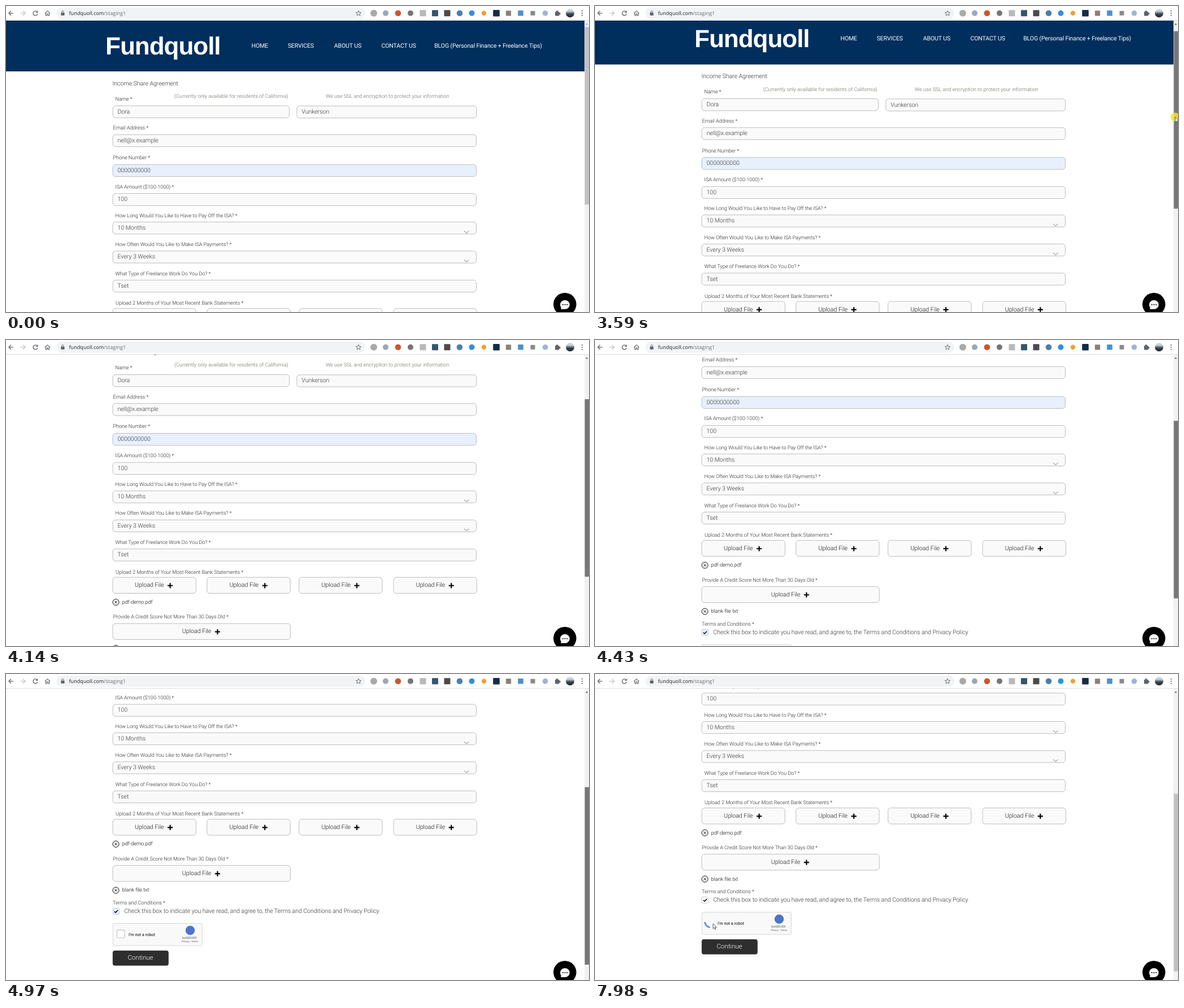
These frames come from a looping animation (1032x543 px, 8 s). An HTML page:

```html
<!DOCTYPE html>
<html lang="en">
<head>
<meta charset="utf-8">
<title>Income Share Agreement</title>
<style>
html, body { margin: 0; width: 100%; height: 100%; overflow: hidden; background: #fff; }
svg { display: block; width: 1032px; height: 543px; }
text { font-family: Roboto, sans-serif; font-weight: 300; white-space: pre; text-rendering: geometricPrecision; }
.body { font-size: 10.6px; letter-spacing: -.07px; fill: #2f2e2e; }
.value { font-size: 10.6px; letter-spacing: -.04px; fill: #333; }
.upload { font-size: 10.6px; fill: #111; }
.label { font-size: 9.1px; letter-spacing: -.04px; fill: #222; }
.note { font-size: 9.1px; letter-spacing: .03px; fill: #66665c; }
.file { font-size: 9.1px; fill: #000; }
.nav { font-size: 10.6px; letter-spacing: -.17px; fill: #fff; font-weight: 400; }
.logo { font: bold 44px "Liberation Sans", Arial, sans-serif; letter-spacing: -1px; fill: #fff; }
.url { font: 9.1px "Open Sans", sans-serif; fill: #202124; }
.submit { font-size: 11.5px; fill: #fff; }
.robot { font-size: 7.3px; font-weight: 400; fill: #000; }
.brand { font-size: 5.4px; font-weight: 400; fill: #555; }
.legal { font-size: 4.3px; font-weight: 400; fill: #555; }
.box { fill: #fafafa; stroke: #bcbcbc; stroke-width: 1; }
.line { fill: none; stroke: #5f6368; stroke-width: 1.3; }
</style>
</head>
<body>
<svg id="stage" viewBox="0 0 1032 543"></svg>
<script>
const LOOP = 8000;
const stage = document.getElementById('stage');

const text = (cls, x, y, s) => `<text class="${cls}" x="${x}" y="${y}">${s}</text>`;
const rect = (x, y, w, h, r, attrs) => `<rect x="${x}" y="${y}" width="${w}" height="${h}" rx="${r}" ${attrs}/>`;
const circle = (x, y, r, attrs) => `<circle cx="${x}" cy="${y}" r="${r}" ${attrs}/>`;
const path = (d, attrs) => `<path d="${d}" ${attrs}/>`;

// x, y, width, value, is a dropdown
const fields = [
  [189, 177, 312.5, 'Dora'],
  [514.8, 177.4, 318, 'Vunkerson'],
  [189, 228.3, 643.5, 'nell@x.example'],
  [189, 281.3, 643.5, '0000000000'],
  [189, 332.8, 643.5, '100'],
  [189, 383.3, 643.5, '10 Months', true],
  [189, 434.8, 643.5, 'Every 3 Weeks', true],
  [189, 486.4, 643.5, 'Tset'],
];
const PHONE = 3;
const labels = [
  [193.5, 167.5, 'Name *'],
  [189.5, 219.3, 'Email Address *'],
  [189.5, 272, 'Phone Number *'],
  [193.5, 323.6, 'ISA Amount ($100-1000) *'],
  [193.5, 374.7, 'How Long Would You Like to Have to Pay Off the ISA? *'],
  [193.5, 426, 'How Often Would You Like to Make ISA Payments? *'],
  [193.5, 477.8, 'What Type of Freelance Work Do You Do? *'],
  [194, 530.3, 'Upload 2 Months of Your Most Recent Bank Statements *'],
  [189.5, 609.8, 'Provide A Credit Score Not More Than 30 Days Old *'],
  [189, 687.8, 'Terms and Conditions *'],
];
const navigation = [[434.5, 'HOME'], [498.7, 'SERVICES'], [580.8, 'ABOUT US'], [664.5, 'CONTACT US'],
  [758.2, 'BLOG (Personal Finance + Freelance Tips)']];

const drawField = ([x, y, w, value, dropdown], i) =>
  rect(x, y, w, 21.3, 5, `class="box" id="field${i}"`) +
  text('value', x + 8.5, y + 13.6, value) +
  (dropdown ? path(`M811 ${y + 15.8}l4.3 3.8l4.3-3.8`, 'class="line" style="stroke:#777;stroke-width:1"') : '');

const drawUpload = (x, y, w, textX) =>
  rect(x, y, w, 28.4, 5, 'class="box"') + text('upload', textX, y + 17.3, 'Upload File') +
  path(`M${textX + 58} ${y + 14.7}h9.2m-4.6-4.6v9.2`, 'stroke="#000" stroke-width="2.1"');

const drawFile = (y, name) =>
  circle(194.5, y, 5.5, 'fill="none" stroke="#000"') +
  path(`M192.2 ${y - 2.3}l4.6 4.6m0-4.6l-4.6 4.6`, 'stroke="#000"') + text('file', 205.5, y + 2.7, name);

const page = `<g id="page">
  ${rect(0, 26, 1024, 90, 0, 'fill="#002e5d"')}${rect(0, 115, 1024, 1, 0, 'fill="#00254d"')}
  ${text('logo', 176, 85.5, 'Fundquoll')}
  ${navigation.map(([x, s]) => text('nav', x, 73.6, s)).join('')}
  ${text('body', 188.5, 140.8, 'Income Share Agreement')}
  ${text('note', 298, 163, '(Currently only available for residents of California)')}
  ${text('note', 566, 163, 'We use SSL and encryption to protect your information')}
  ${labels.map(([x, y, s]) => text('label', x, y, s)).join('')}
  ${fields.map(drawField).join('')}
  ${[[189, 228], [355.8, 395.6], [518.7, 558.5], [686, 725.7]].map(([x, tx]) => drawUpload(x, 536.7, 147.3, tx)).join('')}
  ${drawFile(580.8, 'pdf-demo.pdf')}
  ${drawUpload(189, 618.7, 314.3, 311.8)}
  ${drawFile(662.8, 'blank file.txt')}
  ${rect(189, 694.5, 11.5, 11, 1.5, 'id="terms" stroke="#c4c8d0" stroke-width=".9"')}
  ${path('M191.8 700.2l2.2 2.2l4-4.3', 'fill="none" stroke="#000" stroke-width="1.5"')}
  ${text('body', 209.3, 703.2, 'Check this box to indicate you have read, and agree to, the Terms and Conditions and Privacy Policy')}
  ${rect(189.3, 721.8, 158, 39.3, 1.5, 'fill="#f9f9f9" stroke="#d6d6d6"')}
  ${rect(196.3, 733.4, 13.6, 13.6, 1, 'id="robotBox" fill="#fff" stroke-width="1.1"')}
  ${path('', 'id="spinner" fill="none" stroke="#5b95f5" stroke-width="3"')}
  ${text('robot', 217, 743.6, "I'm not a robot")}
  ${circle(326, 734, 8.2, 'fill="#4a76c9"')}
  ${text('brand', 312, 748.9, 'botSIEVER')}${text('legal', 311, 755, 'Privacy - Terms')}
  ${rect(188.8, 769.8, 99, 26.6, 4, 'fill="#2f2e2e"')}${text('submit', 215.4, 786.2, 'Continue')}
</g>`;

// x, colour, half size, round
const extensions = [
  [651, '#a9a9a9', 6, 1], [672, '#9aa7b8', 5, 1], [694, '#c8572f', 5.3, 1], [716, '#757575', 5, 1],
  [738, '#b9b9b9', 5.5], [759.5, '#34566e', 5.5], [781, '#4b4b4b', 5.5], [803, '#4d7dac', 5.3, 1],
  [824.5, '#2f8fe0', 5, 1], [846, '#f0a030', 4.2, 1], [868, '#142c47', 5.8], [889.5, '#8c8078', 4.6],
  [911, '#4f8fd0', 4.8], [932.5, '#8a8a8a', 4], [954.5, '#9fb2dc', 4.8, 1],
];
const toolbar = `
  ${rect(0, 0, 1032, 25, 0, 'fill="#fff"')}${rect(0, 25, 1032, 1, 0, 'fill="#dcdee1"')}
  ${rect(89, 3, 547, 19.5, 9.7, 'fill="#f1f3f4"')}
  ${path('M13 12.8H5M9 8.8l-4 4l4 4', 'class="line"')}
  ${path('M25.5 12.8H34M30 8.8l4 4l-4 4', 'class="line" style="stroke:#c3c5c8"')}
  ${path('M55.2 10.4A4 4 0 1 0 55.9 14', 'class="line"')}${path('M56.4 8v4h-4z', 'fill="#5f6368"')}
  ${path('M69 13l4.5-4.3l4.5 4.3M70.3 12.3v4.7h2.2v-3h2v3h2.2v-4.7', 'class="line" style="stroke-width:1.1"')}
  ${rect(97.3, 11.7, 6.2, 5, .7, 'fill="#5f6368"')}${path('M98.7 12v-1.7a1.7 1.7 0 0 1 3.4 0V12', 'class="line" style="stroke-width:1"')}
  ${text('url', 111.5, 16, 'fundquoll.com<tspan fill="#6b7075">/staging1</tspan>')}
  ${path('M624 8.3l1.3 3l3.3.3l-2.5 2.1l.8 3.2l-2.9-1.7l-2.9 1.7l.8-3.2l-2.5-2.1l3.3-.3z', 'class="line" style="stroke-width:.9"')}
  ${extensions.map(([x, c, r, round]) => round ? circle(x, 12.8, r, `fill="${c}"`) : rect(x - r, 12.8 - r, 2 * r, 2 * r, 1, `fill="${c}"`)).join('')}
  ${rect(972, 10, 7.5, 7.5, .8, 'fill="#5f6368"')}${circle(975.5, 9.8, 1.7, 'fill="#5f6368"')}${circle(980, 13.6, 1.7, 'fill="#5f6368"')}
  ${circle(998.5, 12.8, 7.5, 'fill="url(#photo)"')}
  ${[8.8, 12.8, 16.8].map(y => circle(1019.8, y, 1.1, 'fill="#5f6368"')).join('')}`;

stage.innerHTML = `
  <defs><linearGradient id="photo" x2="0" y2="1">
    <stop offset=".25" stop-color="#c9d4e0"/><stop offset=".6" stop-color="#38414c"/><stop offset="1" stop-color="#20262e"/>
  </linearGradient></defs>
  ${page}
  ${rect(1024, 26, 8, 517, 0, 'fill="#f1f1f1"')}
  ${path('M1025.8 33.3l2.2-2.6l2.2 2.6z', 'id="scrollUp"')}
  ${rect(1024.5, 37.3, 7.5, 315, 0, 'id="thumb"')}
  ${toolbar}
  ${circle(989.3, 529.3, 20.3, 'fill="#000"')}
  ${path('M981 530a8.4 8 0 1 1 8.4 8h-7.4q1-1.6.5-3.2a8 8 0 0 1-1.5-4.8z', 'fill="#fff"')}
  ${[985.8, 989.5, 993.2].map(x => circle(x, 530, 1.1, 'fill="#000"')).join('')}
  <g id="cursor">
    ${circle(0, 0, 8, 'id="press" fill="#f7e13c" fill-opacity=".85"')}
    ${path('M0 0V9L2.1 7.1L3.5 10.2L4.9 9.6L3.5 6.6H6.2Z', 'id="arrow" fill="#fff" stroke="#333" stroke-width=".8"')}
    ${path('M-2-4.2H2M0-4.2V4.2M-2 4.2H2', 'id="beam" stroke="#333" stroke-width="1"')}
  </g>`;

const el = Object.fromEntries([...stage.querySelectorAll('[id]')].map(e => [e.id, e]));
const set = (e, attrs) => { for (const k in attrs) e.setAttribute(k, attrs[k]); };
const show = (e, on) => set(e, { visibility: on ? 'visible' : 'hidden' });
const between = (t, a, b) => t >= a && t < b;
const progress = (t, a, b) => Math.min(1, Math.max(0, (t - a) / (b - a)));

// Linear interpolation through [time, ...values] keys
function track(keys, t) {
  const next = keys.findIndex(k => k[0] > t);
  if (next < 0) return keys[keys.length - 1].slice(1);
  if (next === 0) return keys[0].slice(1);
  const a = keys[next - 1], b = keys[next], p = progress(t, a[0], b[0]);
  return a.slice(1).map((v, i) => v + (b[i + 1] - v) * p);
}

const cursorKeys = [
  [345, 1022, 533], [540, 835, 467], [735, 640, 397], [890, 640, 397], [1737, 633, 188],
  [1891, 687, 188], [2125, 687, 188], [2195, 790, 185], [2277, 868, 202], [2354, 905, 215],
  [2508, 905, 215], [2900, 985, 200], [3279, 1027, 190], [3510, 1027, 190], [3818, 1027, 219],
  [4050, 1050, 250], [5425, 1050, 360], [5426, 917, 318], [5591, 650, 322], [5668, 650, 322],
  [5820, 361, 431], [6285, 231, 432], [6515, 231, 432], [6820, 203, 440], [7055, 209, 443],
];
const scrollKeys = [[3510, 0], [3818, 50], [4434, 181], [4974, 279], [5205, 299]];

const REFRESH = 77.07;
const snap = t => t < 338 ? 0 : 350 + Math.floor((t - 338) / REFRESH) * REFRESH;

function arc(cx, cy, r, from, to) {
  const at = deg => [cx + r * Math.cos(deg * Math.PI / 180), cy + r * Math.sin(deg * Math.PI / 180)].join(' ');
  return `M${at(from)}A${r} ${r} 0 ${to - from > 180 ? 1 : 0} 1 ${at(to)}`;
}

function render(time) {
  const t = snap(time);
  const [scroll] = track(scrollKeys, t);
  const [x, y] = track(cursorKeys, t);
  const dragging = between(t, 3240, 5260);
  const clicking = between(t, 6780, 6990);
  const active = t >= 345;

  set(el.page, { transform: `translate(0 ${-scroll})` });
  set(el.scrollUp, { fill: scroll ? '#505050' : '#a3a3a3' });
  set(el.thumb, {
    transform: `translate(0 ${scroll * .586})`,
    fill: dragging ? '#787878' : between(t, 2900, 3240) && x >= 1024 ? '#a8a8a8' : '#c1c1c1',
  });

  let beam = false;
  fields.forEach(([fx, fy, w, , dropdown], i) => {
    const hover = active && between(x, fx, fx + w) && between(y + scroll, fy, fy + 21.5);
    if (hover && !dropdown) beam = true;
    set(el['field' + i], {
      style: hover ? 'fill:#e9e9e9;stroke:#e9e9e9' : i === PHONE ? 'fill:#e8f0fe' : '',
    });
  });

  set(el.cursor, { transform: `translate(${x} ${y})` });
  show(el.press, active && (dragging || clicking));
  show(el.arrow, active && !beam);
  show(el.beam, active && beam);

  set(el.terms, { fill: t < 6780 ? '#e6effc' : '#fff' });
  const shrink = 1 - progress(t, 7363, 7600);
  set(el.robotBox, {
    transform: `translate(203.1 740.2) scale(${shrink}) translate(-203.1 -740.2)`,
    stroke: t < 6200 ? '#c1c1c1' : '#b2b2b2',
    fill: clicking ? '#ebebeb' : '#fff',
  });
  const spin = progress(t, 7560, 7980);
  set(el.spinner, { d: spin ? arc(205, 738.2, 10.6, -20 + 118 * spin * spin, -20 + 195 * spin) : '' });
}

function tick() {
  render(performance.now() % LOOP);
  requestAnimationFrame(tick);
}
tick();
</script>
</body>
</html>
```
